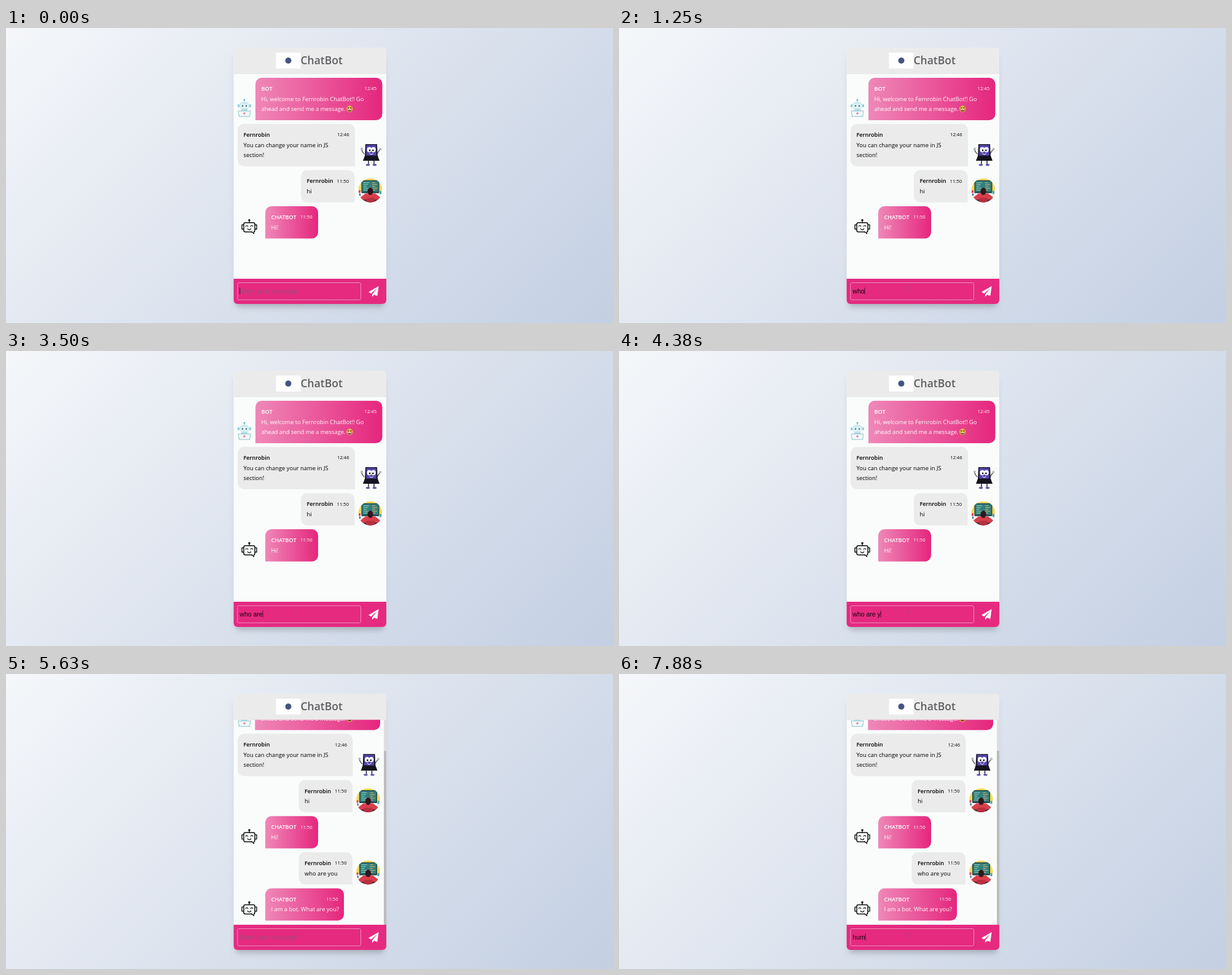
An HTML page with a canvas that plays this animation: 988x480 px, repeating every 8 s.

```html
<!DOCTYPE html>
<html lang="en">
<head>
<meta charset="utf-8">
<title>ChatBot</title>
<style>
html, body { margin: 0; width: 100%; height: 100%; overflow: hidden; }
canvas { display: block; width: 988px; height: 480px; }
</style>
</head>
<body>
<canvas id="stage" width="988" height="480"></canvas>
<script>
const ctx = document.getElementById('stage').getContext('2d');
const LOOP = 8000, SCROLL = 58.7, BAR_SHIFT = -3.5;
const PINK = '#e52a80', GREY = '#ebebec', USER = 'Fernrobin';
const SANS = '"Open Sans", "Noto Sans", sans-serif';
const ARIAL = '"Liberation Sans", Arial, sans-serif';

// Each entry: [time, text in the field]
const TYPING = [
  [0, ''], [1000, 'w'], [1130, 'wh'], [1250, 'who'], [1630, 'who '], [2130, 'who a'],
  [3130, 'who ar'], [3500, 'who are'], [4130, 'who are '], [4380, 'who are y'],
  [4500, 'who are yo'], [4630, 'who are you'], [5000, ''],
  [7630, 'h'], [7750, 'hu'], [7880, 'hum']
];
const POSTED = 5000, REPLIED = 5630;
const CARET_OFF = [[630, 1000], [5630, 7500]];

function rect(x, y, w, h, fill, radius = 0) {
  ctx.beginPath();
  ctx.roundRect(x, y, w, h, radius);
  ctx.fillStyle = fill;
  ctx.fill();
}

function oval(x, y, rx, ry, fill) {
  ctx.beginPath();
  ctx.ellipse(x, y, rx, ry, 0, 0, 7);
  ctx.fillStyle = fill;
  ctx.fill();
}

function poly(points, fill) {
  ctx.beginPath();
  points.forEach(([x, y]) => ctx.lineTo(x, y));
  ctx.fillStyle = fill;
  ctx.fill();
}

function line(points, color, width = 1) {
  ctx.beginPath();
  points.forEach(([x, y], i) => i ? ctx.lineTo(x, y) : ctx.moveTo(x, y));
  ctx.strokeStyle = color;
  ctx.lineWidth = width;
  ctx.stroke();
}

function arc(x, y, r, from, to, color, width = 1) {
  ctx.beginPath();
  ctx.arc(x, y, r, from, to);
  ctx.strokeStyle = color;
  ctx.lineWidth = width;
  ctx.stroke();
}

function text(str, x, y, font, color, align = 'left') {
  ctx.font = font;
  ctx.fillStyle = color;
  ctx.textAlign = align;
  ctx.fillText(str, x, y);
}

function at(x, y, draw) {
  ctx.save();
  ctx.translate(x, y);
  draw();
  ctx.restore();
}

function bubble(left, right, top, name, time, lines, fromBot) {
  const height = 36 + 16.5 * lines.length;
  let fill = GREY;
  if (fromBot) {
    fill = ctx.createLinearGradient(left, 0, right, 0);
    fill.addColorStop(0, '#ef88b8');
    fill.addColorStop(1, '#e5267d');
  }
  rect(left, top, right - left, height, fill, fromBot ? [10, 10, 10, 0] : [10, 10, 0, 10]);
  const ink = fromBot ? '#fff' : '#000';
  text(name, left + 9.5, top + 21, `600 9.1px ${SANS}`, ink);
  text(time, right - 9.5, top + 20.3, `7.6px ${SANS}`, ink, 'right');
  lines.forEach((str, i) => text(str, left + 9.5, top + 37.6 + 16.5 * i, `9.35px ${SANS}`, ink));
}

function toyRobot() {
  const edge = '#8fc3cc', pale = '#cfeaf0';
  line([[0, -13], [0, -9]], edge);
  oval(0, -13, 1.5, 1.5, '#6fb5c2');
  rect(-8.5, -10, 17, 11, pale, [8, 8, 5, 5]);
  rect(-11, -6, 3, 5, '#8fd0dc', 1.5);
  rect(8, -6, 3, 5, '#8fd0dc', 1.5);
  rect(-6, -5.5, 12, 5, '#eefafa', 2.5);
  oval(-3, -3.2, 1.4, 1.4, '#40737f');
  oval(3, -3.2, 1.4, 1.4, '#40737f');
  rect(-5, 1.5, 10, 4, '#b2dce4');
  poly([[-10.5, 4.5], [10.5, 4.5], [9, 14.5], [-9, 14.5]], edge);
  poly([[-9.5, 5.5], [9.5, 5.5], [8, 13.5], [-8, 13.5]], '#f0f8f8');
  oval(0, 9, 1.8, 1.8, '#e88790');
}

function laptopBuddy() {
  const dark = '#1b1830';
  line([[-11, -1], [-14, -5], [-16, -10]], '#333', 1.2);
  line([[10, -1], [13, -6], [16, -9]], '#333', 1.2);
  oval(-15, -9.5, 2, 2, '#b8bac4');
  oval(15.5, -9, 2, 2, '#b8bac4');
  poly([[-9, -17], [10, -17], [11, 4], [-10, 4]], dark);
  rect(-7.5, -15.5, 16, 17, '#5546aa');
  oval(-2.7, -8, 3.8, 4.2, '#fff');
  oval(4, -8, 3.8, 4.2, '#fff');
  oval(-2, -7, 1.3, 1.6, '#111');
  oval(3.3, -7, 1.3, 1.6, '#111');
  arc(.5, -3.5, 3.2, .3, 2.8, '#fff');
  poly([[-10, 2], [11, 2], [14, 10], [-13, 10]], '#15131d');
  line([[-4, 10], [-4, 16]], '#252238', 1.5);
  line([[5, 10], [5, 16]], '#252238', 1.5);
  oval(-5, 16.8, 3.3, 1.7, '#6556a8');
  oval(6, 16.8, 3.3, 1.7, '#6556a8');
}

function coder() {
  ctx.beginPath();
  ctx.arc(0, 0, 19.5, 0, 7);
  ctx.clip();
  rect(-20, -20, 40, 40, '#f8f4df');
  oval(0, -4, 19.5, 16, '#f5d85c');
  rect(-20, 2, 40, 8, '#fafafa');
  rect(-14.5, -16.5, 29, 21, '#21494b', 1);
  rect(-13, -15, 26, 17, '#347f7c');
  for (let i = 0; i < 5; i++) {
    rect(-11, -13 + i * 3, 9 - i % 3 * 2, 1, '#8cd4c5');
    rect(3, -13 + i * 3, 5 + i % 2 * 3, 1, '#ddb36c');
  }
  rect(-19, 0, 3, 4, '#d84a53');
  rect(-18, 5, 2, 4, '#3c5c84');
  rect(15, 1, 3, 5, '#4ba8a6');
  rect(-20, 11.5, 40, 9, '#3b2b32');
  poly([[-17, 12], [-8, 5], [8, 5], [17, 12], [14, 15], [-14, 15]], '#d93f4b');
  rect(-7, 12, 14, 8, '#b92f40', 2);
  oval(0, 1.5, 4.6, 6, '#32171e');
}

function chatIcon() {
  const ink = '#111';
  ctx.lineJoin = 'round';
  oval(0, -10.5, 1.8, 1.8, ink);
  line([[0, -9], [0, -6]], ink, 1.4);
  ctx.beginPath();
  ctx.roundRect(-9, -6.5, 18, 15, 2.5);
  ctx.strokeStyle = ink;
  ctx.lineWidth = 1.5;
  ctx.stroke();
  poly([[2, 7.7], [8, 7.7], [8, 12.5]], ink);
  poly([[4, 7], [7, 7], [7, 10]], '#f9fcfb');
  line([[-9, -3], [-12, -3], [-12, 4], [-9, 4]], ink, 1.4);
  line([[9, -3], [12, -3], [12, 4], [9, 4]], ink, 1.4);
  arc(-4, 0, 1.8, Math.PI, 0, ink, 1.2);
  arc(4, 0, 1.8, Math.PI, 0, ink, 1.2);
  arc(0, 2, 3, .3, 2.84, ink, 1.2);
}

function laughing() {
  oval(0, 0, 5.2, 5.2, '#e9b64a');
  line([[-3.4, -2.6], [-1, -1.5], [-3.4, -.6]], '#60401d', .9);
  line([[3.4, -2.6], [1, -1.5], [3.4, -.6]], '#60401d', .9);
  ctx.beginPath();
  ctx.arc(0, .7, 3.5, 0, Math.PI);
  ctx.fillStyle = '#67401f';
  ctx.fill();
  rect(-2.8, .8, 5.6, 1.1, '#fff');
}

function backdrop() {
  const fill = ctx.createLinearGradient(127, -127, 861, 607);
  fill.addColorStop(0, '#f5f7fa');
  fill.addColorStop(1, '#c3cfe2');
  rect(0, 0, 988, 480, fill);
  ctx.save();
  ctx.shadowColor = 'rgba(0,0,0,.2)';
  ctx.shadowBlur = 10;
  ctx.shadowOffsetY = 9;
  rect(374, 36, 241, 409, '#f9fcfb', 5);
  ctx.restore();
  rect(370.5, 32, 248.5, 417, '#f9fcfb', 6);
}

function header() {
  rect(370.5, 32, 248.5, 42.5, GREY, [6, 6, 0, 0]);
  rect(370.5, 73.7, 248.5, .8, '#e2e2e2');
  rect(439.5, 40, 40, 26, '#fff');
  oval(459.5, 53, 5, 5, '#46547f');
  text('ChatBot', 479.5, 59, `600 17.5px ${SANS}`, '#5f5f62');
}

function messages(t) {
  const posted = t >= POSTED, replied = t >= REPLIED;
  const dx = replied ? BAR_SHIFT : 0;
  ctx.save();
  ctx.beginPath();
  ctx.rect(370.5, 74.5, 248.5, 333.5);
  ctx.clip();
  ctx.save();
  if (replied) ctx.translate(0, -SCROLL);

  at(388, 130, toyRobot);
  bubble(replied ? 405.3 : 406, 612.5 + dx, 81, 'BOT', '12:45',
    [`Hi, welcome to ${USER} ChatBot!! Go`, 'ahead and send me a message.'], true);
  at(559.2, 131.5, laughing);

  bubble(377, 568 + dx, 156, USER, '12:46', ['You can change your name in JS', 'section!'], false);
  at(594 + dx, 206, laptopBuddy);

  bubble(480 + dx, 567.5 + dx, 231.3, USER, '11:50', ['hi'], false);
  at(593 + dx, 264.3, coder);

  bubble(422, 508, 290, 'CHATBOT', '11:50', ['Hi!'], true);
  at(396, 323.3, chatIcon);

  if (posted) {
    bubble(480 + dx, 567.5 + dx, 348.8, USER, '11:50', ['who are you'], false);
    at(593 + dx, 381.8, coder);
  }
  if (replied) {
    bubble(422, 550, 407.5, 'CHATBOT', '11:50', ['I am a bot. What are you?'], true);
    at(396, 440.8, chatIcon);
  }
  ctx.restore();
  if (replied) {
    rect(615, 74.5, 4, 334, '#dfdfdf');
    rect(615, 125, 4, 283, '#bdbdbd');
  }
  ctx.restore();
}

function footer(t) {
  rect(370.5, 408, 248.5, 41, PINK, [0, 0, 6, 6]);
  ctx.beginPath();
  ctx.roundRect(376.8, 414.5, 200.7, 27.8, 2);
  ctx.strokeStyle = '#ee8fb9';
  ctx.lineWidth = 1;
  ctx.stroke();

  const typed = TYPING.findLast(([start]) => t >= start)[1];
  const font = `10.5px ${ARIAL}`;
  text(typed || 'Enter your message', 380.3, 431.8, font, typed ? '#16040c' : '#a04c78');
  if (!CARET_OFF.some(([from, to]) => t >= from && t < to)) {
    rect(380.3 + ctx.measureText(typed).width, 422.5, .8, 11, '#2a0c1a');
  }

  // Text pointer
  rect(471.4, 421, .8, 8, '#a8467a');
  rect(470.3, 420.6, 3, .7, '#a8467a');

  poly([[606.6, 420], [590, 429.6], [594.2, 432.1], [604.3, 423.2],
    [595.9, 433.5], [596, 437.2], [599.4, 434], [604.4, 436]], '#fff');
}

function frame(now) {
  const t = now % LOOP;
  backdrop();
  header();
  messages(t);
  footer(t);
  requestAnimationFrame(frame);
}

const start = performance.now();
const tick = () => {
  const t = (performance.now() - start) % LOOP;
  backdrop();
  header();
  messages(t);
  footer(t);
  requestAnimationFrame(tick);
};
tick();
</script>
</body>
</html>
```
